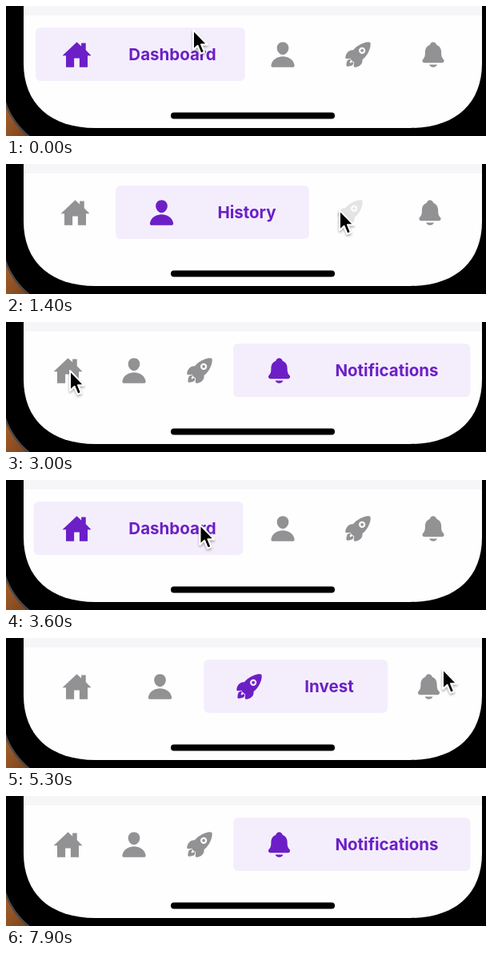
Write an HTML page that moves like this. It is 600 by 163 pixels and loops after 8000 ms.

```html
<!DOCTYPE html>
<html lang="en">
<head>
<meta charset="utf-8">
<title>Tab bar</title>
<style>
  html, body { margin: 0; width: 100%; height: 100%; overflow: hidden; background: #000; }
  svg { display: block; width: 600px; height: 163px; }
  text { font: 700 20.5px Inter, Roboto, sans-serif; text-anchor: middle; fill: #6c1fc6; }
</style>
</head>
<body>
<svg viewBox="0 0 600 163">
  <defs>
    <clipPath id="screen"><path d="M22 -10V72C22 122 55 153 112 153H505C562 153 595 122 595 72V-10Z"/></clipPath>
    <filter id="shadow" x="-50%" y="-50%" width="200%" height="200%">
      <feDropShadow dx="0" dy="2" stdDeviation="1.6" flood-opacity=".35"/>
    </filter>
    <linearGradient id="desk" x2="1" y2="1">
      <stop stop-color="#a4602c"/><stop offset="1" stop-color="#7d431c"/>
    </linearGradient>
  </defs>
  <rect width="600" height="163"/>
  <path d="M0 124Q8 147 26 163H0Z" fill="url(#desk)"/>
  <path d="M-1 121Q8 147 29 164" fill="none" stroke="#4b4a4c" stroke-width="2.5"/>
  <g clip-path="url(#screen)">
    <rect width="600" height="163" fill="#fffeff"/>
    <rect width="600" height="12" fill="#f6f5f8"/>
    <rect id="pill" y="27" height="67" rx="6" fill="#f4eefc"/>
    <g id="tabs"></g>
    <text id="label" y="68"></text>
    <rect x="206" y="133.5" width="205" height="8" rx="4"/>
  </g>
  <path id="cursor" filter="url(#shadow)" stroke="#fff" stroke-width="2" stroke-linejoin="round"
    d="M1 1V26L6.6 20.8 10.6 30.6 15 28.8 11 19.2H18.6Z"/>
</svg>
<script>
const LOOP = 8000, GREY = '#929294', PURPLE = '#6c1fc6';

// Icons on a 512 grid, drawn at 36px
const ICONS = [
  'M416 175V48h-80v58L256 32 0 272h64v208h144V320h96v160h144V272h64z',
  'M333 65C313 44 286 32 256 32s-57 12-77 32-29 50-27 81c5 61 51 111 104 111s99-50 104-111c2-31-8-59-27-80z' +
    'M432 480H80a31 31 0 0 1-31-40C57 393 83 354 125 326c37-25 83-38 131-38s94 13 131 38c42 28 68 67 76 114a31 31 0 0 1-31 40z',
  'M477 50a20 20 0 0 0-15-15C432 27 385 35 334 56 281 77 232 108 199 141a320 320 0 0 0-30 34c-22-1-42 2-58 9-58 26-75 91-79 118' +
    'a25 25 0 0 0 27 29l64-7a34 34 0 0 0 10 23l32 31a34 34 0 0 0 23 10l-7 64a25 25 0 0 0 29 28c27-5 92-21 117-79 7-16 10-36 9-58' +
    'a315 315 0 0 0 34-30c33-33 65-82 85-134 21-51 29-98 22-129z' +
    'M270 183a59 59 0 0 1 118 0 59 59 0 0 1-118 0zM302 183a27 27 0 0 1 54 0 27 27 0 0 1-54 0z' +
    'M162 386a16 16 0 0 0-11 3l-19 13c-13 8-29-6-21-20l12-21a16 16 0 0 0-15-25c-14 2-26 8-36 18-4 3-15 14-21 57a358 358 0 0 0-3 37' +
    'a16 16 0 0 0 16 16 360 360 0 0 0 37-3c43-6 54-17 58-21a60 60 0 0 0 17-36 16 16 0 0 0-14-18z',
  'M440 341c-25-30-40-42-40-124 0-70-28-112-84-136-9-29-33-49-60-49s-51 20-60 49c-56 24-84 66-84 136 0 82-15 94-40 124' +
    'a35 35 0 0 0 30 59h308a35 35 0 0 0 30-59zM256 480a80 80 0 0 0 70-42 4 4 0 0 0-3-6H189a4 4 0 0 0-3 6 80 80 0 0 0 70 42z'
];

// Layout when each tab is open
const VIEWS = [
  { name: 'Dashboard',     x: 37,  w: 262, label: 208, icons: [88.5, 346, 440, 534] },
  { name: 'History',       x: 137, w: 242, label: 301, icons: [86.5, 194.5, 430, 530] },
  { name: 'Invest',        x: 246, w: 230, label: 404, icons: [88.5, 192.5, 304, 528.5] },
  { name: 'Notifications', x: 284, w: 296.5, label: 476, icons: [77.5, 160, 242, 341.5] }
];

// [press, release, tab]
const TAPS = [
  [320, 505, 1], [1300, 1405, 2], [2090, 2205, 3], [3010, 3090, 0],
  [3960, 4101, 1], [4690, 4800, 2], [5440, 5570, 3]
];

// [time, x, y] of the pointer tip
const PATH = [
  [0, 233, 29], [400, 337, 41], [600, 337, 41], [1320, 416, 57], [1460, 416, 57],
  [2080, 540, 44], [2240, 540, 44], [2940, 79, 60], [3150, 79, 60], [3920, 338, 52],
  [4100, 342, 53], [4200, 360, 56], [4660, 424, 50], [4840, 424, 50], [5280, 545, 38],
  [5900, 547, 39], [6400, 549, -45]
];

const $ = id => document.getElementById(id);
const pill = $('pill'), label = $('label'), cursor = $('cursor');
const clamp = v => Math.min(1, Math.max(0, v));
const mix = (a, b, k) => a + (b - a) * k;

const icons = ICONS.map(d => {
  const el = document.createElementNS('http://www.w3.org/2000/svg', 'path');
  el.setAttribute('d', d);
  el.setAttribute('fill-rule', 'evenodd');
  return $('tabs').appendChild(el);
});

// Lightly underdamped spring from 0 to 1
function spring(ms) {
  const s = ms * 0.0129, z = 0.75, wd = Math.sqrt(1 - z * z);
  return 1 - Math.exp(-z * s) * (Math.cos(wd * s) + z / wd * Math.sin(wd * s));
}

function pointer(t) {
  const i = PATH.findIndex(p => p[0] > t);
  if (i < 0) return PATH[PATH.length - 1].slice(1);
  const [t0, x0, y0] = PATH[i - 1], [t1, x1, y1] = PATH[i];
  const u = (t - t0) / (t1 - t0), k = u * u * (3 - 2 * u);
  return [mix(x0, x1, k), mix(y0, y1, k)];
}

function render(t) {
  let from = 0, tab = 0, since = -LOOP;
  for (const [, up, next] of TAPS) {
    if (t < up) break;
    from = tab; tab = next; since = up;
  }
  const view = VIEWS[tab], age = t - since;
  const shown = clamp(age / 355);
  const tap = TAPS.find(([down, up]) => t >= down && t < up);

  pill.setAttribute('x', mix(VIEWS[from].x, view.x, spring(age)));
  pill.setAttribute('width', view.w);
  label.textContent = view.name;
  label.setAttribute('x', view.label);
  label.setAttribute('opacity', shown);

  icons.forEach((el, i) => {
    const pressed = tap && tap[2] === i ? mix(1, 0.25, clamp((t - tap[0]) / 70)) : 1;
    el.setAttribute('transform', `translate(${view.icons[i] - 18} 43) scale(${36 / 512})`);
    el.setAttribute('fill', i === tab ? PURPLE : GREY);
    el.setAttribute('opacity', i === tab ? shown : pressed);
  });
  cursor.setAttribute('transform', `translate(${pointer(t).join(' ')})`);
}

const start = performance.now();
function tick() {
  render((performance.now() - start) % LOOP);
  requestAnimationFrame(tick);
}
tick();
</script>
</body>
</html>
```
